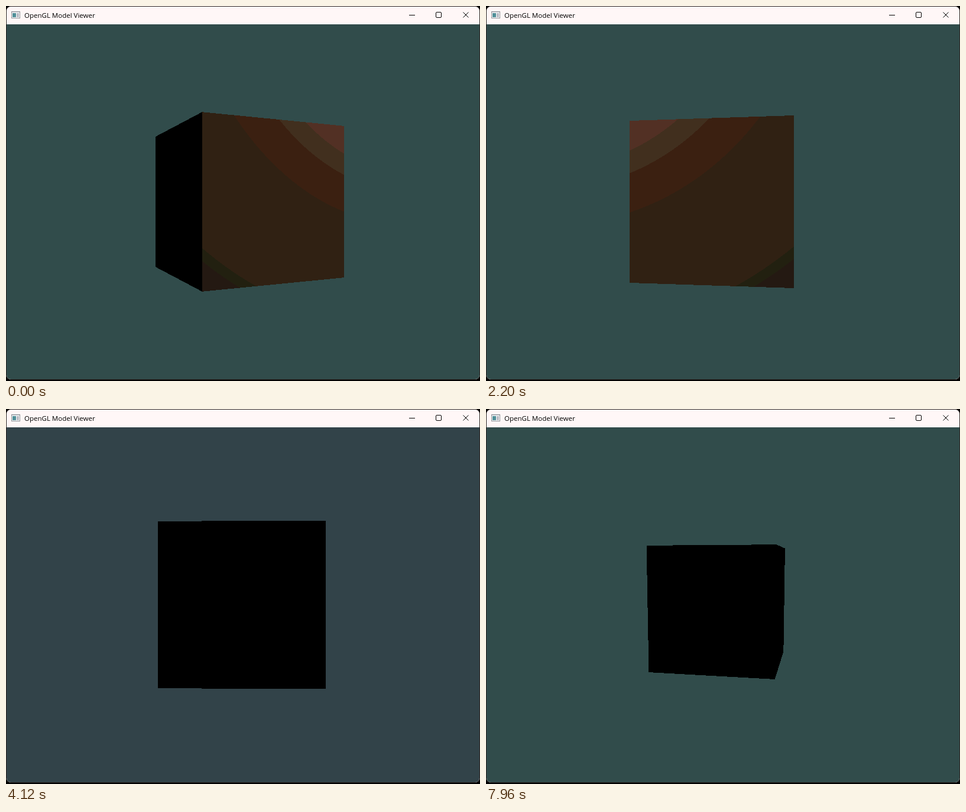
Write an HTML page with a canvas that moves like this. It is 802 by 634 pixels and loops after 8 s.

```html
<!DOCTYPE html>
<html lang="en">
<head>
<meta charset="utf-8">
<title>OpenGL Model Viewer</title>
<style>
  html, body { margin: 0; width: 100%; height: 100%; overflow: hidden; background: #000; }
  #win {
    position: absolute; left: 0; top: 0; width: 802px; height: 632px;
    box-sizing: border-box; border: 1px solid #2c2624; border-radius: 8px;
    overflow: hidden; background: #fff7f7;
  }
  #win h1 {
    position: absolute; left: 30px; top: 0; margin: 0;
    font: 400 11.5px/30px "Open Sans", "Noto Sans", sans-serif;
    color: #000; white-space: nowrap;
  }
  #chrome { position: absolute; left: -1px; top: -1px; }
  #view { position: absolute; left: 0; top: 30px; }
</style>
</head>
<body>
<div id="win">
  <h1>OpenGL Model Viewer</h1>
  <svg id="chrome" width="802" height="31" fill="none" stroke="#000">
    <g stroke="none">
      <path fill="#8d9197" d="M9 9h15v12H9z"/>
      <path fill="#fff" d="M10 11h13v9H10z"/>
      <path fill="#c9ccd2" d="M10 10h13v1H10z"/>
      <path fill="#4f8f98" d="M11 12h6v7h-6z"/>
      <path fill="#b9bcc4" d="M18 12h4v7h-4z"/>
    </g>
    <path d="M682 15.5h10"/>
    <rect x="727.5" y="10.5" width="9" height="9" rx="1.5"/>
    <path d="M773.5 10.5l9 9M782.5 10.5l-9 9"/>
  </svg>
  <canvas id="view" width="800" height="600"></canvas>
</div>
<script>
const LOOP = 8000, STEP = 40;
const FOCAL = 300 / Math.tan(Math.PI / 8);
const RAD = Math.PI / 180;
const LIGHT = { side: 1, y: 1.5 };
const BLACK = 0xff000000;

// Mouse strokes: each eases one camera value to a new one
const rest = { yaw: -26.2, pitch: 0, dist: 3.055 };
const strokes = [
  { key: "yaw", from: 0, until: 840, to: -16.6 },
  { key: "yaw", from: 840, until: 2200, to: 99.4 },
  { key: "yaw", from: 2360, until: 4120, to: -89 },
  { key: "dist", from: 4440, until: 4800, to: 3.745 },
  { key: "yaw", from: 5200, until: 6040, to: -109.5 },
  { key: "yaw", from: 6080, until: 6680, to: -168.3 },
  { key: "pitch", from: 7840, until: 7960, to: 5.9 }
];

// Light falls off in steps, by squared distance from the light's foot
const bands = [
  { reach: 1.65, color: "#523024" },
  { reach: 2, color: "#412f1e" },
  { reach: 2.7, color: "#3b2011" },
  { reach: 5.34, color: "#302113" },
  { reach: 5.6, color: "#222010" },
  { reach: Infinity, color: "#241912" }
];

function toPixel(hex) {
  const n = parseInt(hex.slice(1), 16);
  return (0xff000000 | (n & 255) << 16 | n & 0xff00 | n >> 16) >>> 0;
}
for (const b of bands) b.pixel = toPixel(b.color);

const view = document.getElementById("view");
const ctx = view.getContext("2d");
const box = { x: 205, y: 135, w: 390, h: 330 };
const image = ctx.createImageData(box.w, box.h);
const pixels = new Uint32Array(image.data.buffer);

// Nearly steady drag with slightly soft ends
const ease = k => 0.7 * k + 0.3 * k * k * (3 - 2 * k);

function pose(t) {
  const cam = { ...rest };
  for (const { key, from, until, to } of strokes) {
    const k = Math.min(1, Math.max(0, (t - from) / (until - from)));
    cam[key] += (to - cam[key]) * ease(k);
  }
  return cam;
}

function shade(side, y) {
  const d = (LIGHT.side - side) ** 2 + (LIGHT.y - y) ** 2;
  return bands.find(b => d < b.reach).pixel;
}

// Ray against the unit cube; returns 0 for a miss
function trace(eye, dir) {
  let near = -Infinity, far = Infinity, axis = 0;
  for (let i = 0; i < 3; i++) {
    const inv = 1 / (dir[i] || 1e-12);
    const mid = -eye[i] * inv, half = 0.5 * Math.abs(inv);
    if (mid - half > near) { near = mid - half; axis = i; }
    far = Math.min(far, mid + half);
  }
  if (near > far) return 0;
  if (axis === 1 || dir[axis] > 0) return BLACK;
  const other = 2 - axis;
  return shade(eye[other] + dir[other] * near, eye[1] + dir[1] * near);
}

function drawCube({ yaw, pitch, dist }) {
  const sa = Math.sin(yaw * RAD), ca = Math.cos(yaw * RAD);
  const sp = Math.sin(pitch * RAD), cp = Math.cos(pitch * RAD);
  const back = [sa * cp, sp, ca * cp];
  const right = [ca, 0, -sa];
  const up = [-sa * sp, cp, -ca * sp];
  const eye = back.map(v => v * dist);
  const dir = [0, 0, 0];
  let n = 0;
  for (let row = 0; row < box.h; row++) {
    const y = (300 - box.y - row - 0.5) / FOCAL;
    for (let col = 0; col < box.w; col++) {
      const x = (box.x + col + 0.5 - 400) / FOCAL;
      for (let i = 0; i < 3; i++) dir[i] = right[i] * x + up[i] * y - back[i];
      pixels[n++] = trace(eye, dir);
    }
  }
  ctx.putImageData(image, box.x, box.y);
}

const start = performance.now();
let shown = -1;

function tick() {
  const t = Math.floor((performance.now() - start) % LOOP / STEP) * STEP;
  if (t !== shown) {
    shown = t;
    drawCube(pose(t));
    // the backdrop turns bluer while the camera rests before zooming
    view.style.background = t >= 4120 && t < 4480 ? "#324349" : "#314c4b";
  }
  requestAnimationFrame(tick);
}
tick();
</script>
</body>
</html>
```
